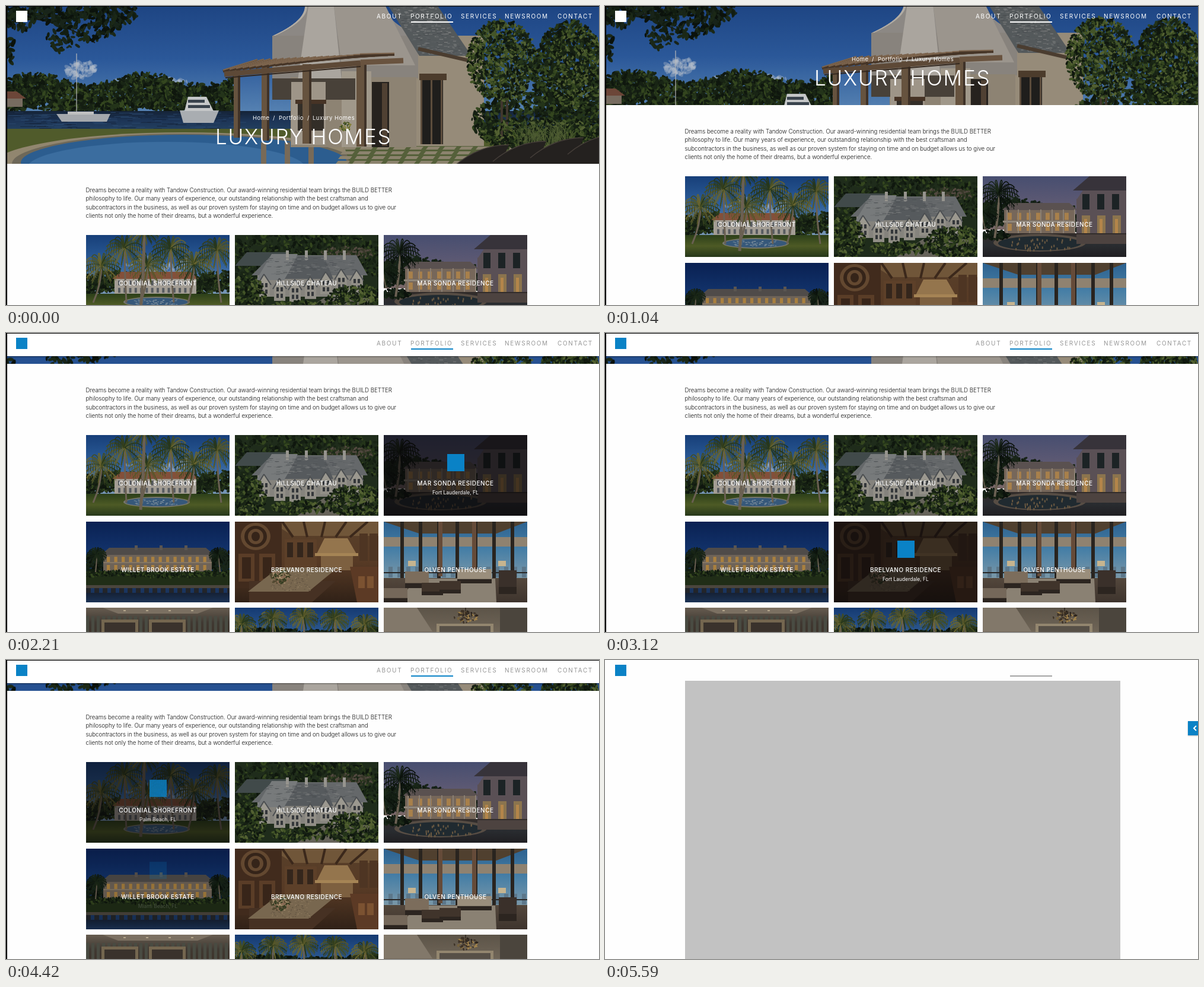
Recreate the animation shown at these times as an HTML page with a canvas. Size 1000x504 px, loop 5720 ms.

```html
<!DOCTYPE html>
<html lang="en">
<head>
<meta charset="utf-8">
<title>Luxury Homes</title>
<style>
html, body { margin: 0; width: 100%; height: 100%; overflow: hidden; background: #fefefe; }
body { position: relative; font-family: Inter, "Open Sans", sans-serif; }
body * { position: absolute; white-space: nowrap; }
.stage { left: 0; top: 0; width: 1000px; height: 504px; overflow: hidden; --y: 0; --k: 0; }

.page { width: 1000px; height: 820px; transform: translateY(calc(var(--y) * -1px)); }
.hero { width: 1000px; height: 266px; overflow: hidden; color: #fff; }
.hero canvas { left: 0; top: 0; transform: translateY(calc(var(--y) * .95px)); }
.crumb { top: 182px; font-size: 9.5px; line-height: 14px; letter-spacing: .5px; }
h1 { left: 353px; top: 200px; margin: 0; font-size: 35px; font-weight: 300; line-height: 41px; letter-spacing: 1.8px; }
p { left: 134.5px; top: 303.8px; margin: 0; font-size: 9.7px; font-weight: 300; line-height: 14.4px; color: #111; }

.tile, .tip { width: 242px; height: 136px; overflow: hidden; color: #fff; text-align: center; }
.tile canvas, .tip { left: 0; top: 0; }
.tip { --h: 0; background: rgba(8, 7, 8, calc(var(--h) * .64)); }
.tip i { left: 107px; top: 32px; width: 29px; height: 29px; background: #0a82c6;
  opacity: var(--h); transform: translateY(calc((var(--h) - 1) * 12px)); }
.tip span { left: 0; width: 100%; top: 91px; font-size: 8.5px; line-height: 12px; opacity: var(--h); }
.tile b { left: 0; width: 100%; top: 75px; font-size: 10px; font-weight: 500; line-height: 12px; letter-spacing: .5px; }

.head { width: 1000px; height: 39px; background: rgba(255, 255, 255, var(--k));
  box-shadow: 0 1px 2px rgba(0, 0, 0, calc(var(--k) * .45)); }
.head a { top: 10px; font-size: 10px; line-height: 15px; letter-spacing: 1.65px;
  color: rgb(calc(255 - 105 * var(--k)), calc(255 - 105 * var(--k)), calc(255 - 105 * var(--k))); }
.mark, .rule { background: rgb(calc(255 - 245 * var(--k)), calc(255 - 125 * var(--k)), calc(255 - 57 * var(--k))); }
.mark { left: 17px; top: 8px; width: 19px; height: 19px; }
.rule { left: 683px; top: 26px; width: 71px; height: 1.6px; }
.edge { width: 1000px; height: 504px; box-sizing: border-box; border: solid #000; border-width: 1px 0 0 2px; }

.load { width: 1000px; height: 504px; background: #fefefe; visibility: hidden; --k: 1; }
.load .rule { background: #a3a3a3; }
.blank { left: 135px; top: 35px; width: 734px; height: 469px; background: #c2c2c2; }
.tab { left: 983px; top: 103px; width: 17px; height: 24px; background: #0a82c6; box-shadow: 0 1px 2px #bbb; }
.tab svg { left: 8px; top: 7px; }
</style>
</head>
<body>
<div class="stage">
  <div class="page">
    <div class="hero">
      <span class="crumb" style="left:416px">Home</span><span class="crumb" style="left:450px">/</span>
      <span class="crumb" style="left:460px">Portfolio</span><span class="crumb" style="left:508px">/</span>
      <span class="crumb" style="left:517px">Luxury Homes</span>
      <h1>LUXURY HOMES</h1>
    </div>
    <p>Dreams become a reality with Tandow Construction. Our award-winning residential team brings the BUILD BETTER<br>philosophy to life. Our many years of experience, our outstanding relationship with the best craftsman and<br>subcontractors in the business, as well as our proven system for staying on time and on budget allows us to give our<br>clients not only the home of their dreams, but a wonderful experience.</p>
  </div>
  <div class="head">
    <div class="mark"></div>
    <a style="left:625px">ABOUT</a><a style="left:682px">PORTFOLIO</a><a style="left:767px">SERVICES</a>
    <a style="left:841px">NEWSROOM</a><a style="left:930px">CONTACT</a>
    <div class="rule"></div>
  </div>
  <div class="edge"></div>
  <div class="load">
    <div class="mark"></div><div class="rule"></div><div class="blank"></div>
    <div class="tab"><svg width="7" height="10"><path d="M6 1L2 5l4 4" fill="none" stroke="#fff" stroke-width="2"/></svg></div>
  </div>
</div>
<script>
let g, seed = 7;
const rand = (a = 0, b = 1) => a + (b - a) * (seed = seed * 16807 % 2147483647) / 2147483647;
const pick = list => list[rand(0, list.length) | 0];
const times = (n, f) => { for (let i = 0; i < n; i++) f(i); };

const box = (c, x, y, w, h) => { g.fillStyle = c; g.fillRect(x, y, w, h); };
const oval = (c, x, y, rx, ry, turn = 0) => {
  g.fillStyle = c; g.beginPath(); g.ellipse(x, y, rx, ry, turn, 0, 7); g.fill();
};
// Top edge a-b at y, bottom edge c-d at y2
const trap = (col, a, b, y, c, d, y2) => {
  g.fillStyle = col; g.beginPath();
  g.moveTo(a, y); g.lineTo(b, y); g.lineTo(d, y2); g.lineTo(c, y2); g.fill();
};
const curve = (c, w, x, y, cx, cy, ex, ey) => {
  g.strokeStyle = c; g.lineWidth = w; g.beginPath(); g.moveTo(x, y); g.quadraticCurveTo(cx, cy, ex, ey); g.stroke();
};
const line = (c, w, x, y, ex, ey) => curve(c, w, x, y, x, y, ex, ey);
const fade = (y, h, ...cols) => {
  const s = g.createLinearGradient(0, y, 0, y + h);
  cols.forEach((c, i) => s.addColorStop(i / (cols.length - 1), c));
  box(s, 0, y, g.canvas.width, h);
};
const row = (c, x, y, w, h, step, n) => times(n, i => box(c, x + i * step, y, w, h));
const leaves = (x, y, rx, ry, n, size, cols) => times(n, () => {
  const a = rand(0, 6.283), r = Math.sqrt(rand()), s = size * rand(.5, 1.2);
  oval(pick(cols), x + Math.cos(a) * rx * r, y + Math.sin(a) * ry * r, s, s * .5, rand(0, 3));
});
// A tree line with a rolling top edge
const hedge = (x, x2, y, h, size, cols) => {
  for (; x < x2; x += size * 2) leaves(x, y + h / 2 - Math.sin(x / 30) * h / 6, size * 2, h / 2, h * 1.3, size, cols);
};
const house = (x, y, w, h, wall, roof, glass, n) => {
  box(wall, x, y, w, h);
  trap(roof, x + 10, x + w - 10, y - 11, x - 4, x + w + 4, y + 1);
  times(2, i => row(glass, x + 6, y + h * (.14 + i * .46), w / n * .4, h * .3, (w - 8) / n, n));
};
const palm = (x, y, tx, ty, r, w, cols) => {
  curve('#6a6052', w, x, y, tx, (y + ty) / 2, tx, ty);
  times(18, i => {
    const a = i * .349, ex = Math.cos(a) * r, ey = Math.sin(a) * r * .7 + r * .2, c = pick(cols);
    curve(c, 1.6, tx, ty, tx + ex * .6, ty + ey - r * .4, tx + ex, ty + ey);
    for (let k = .3; k < 1; k += .12) line(c, 1, tx + ex * k, ty + ey * k - r * .7 * k * (1 - k), tx + ex * k * 1.06, ty + ey * k + r * .2);
  });
};
const green = ['#0f170e', '#192515', '#24341a', '#34461f', '#151f13'];
const lush = [...green, '#445528', '#536132'];
const dark = ['#0b120c', '#121d11', '#1b2817', '#18241a'];
const frond = ['#26361b', '#444d22', '#6a652e', '#343f1d', '#57572a'];
const haze = ['rgba(168,180,198,.4)', 'rgba(190,197,208,.4)'];
const stone = ['#5b5f61', '#6d7071', '#7b7d7d', '#4c5053'];

function hero() {
  box('#1f2c19', 0, 0, 1000, 280);
  fade(0, 180, '#1e4583', '#2b5899', '#5682b2');
  leaves(126, 108, 26, 13, 60, 6, haze);
  leaves(240, 127, 65, 5, 60, 5, haze);
  hedge(0, 385, 122, 62, 5, green);
  trap('#6c4638', 0, 18, 144, 0, 34, 156);
  box('#776c60', 0, 156, 28, 14);
  fade(177, 33, '#152337', '#1d3557', '#23405f');
  times(150, () => box(pick(['#2b4a70', '#142238']), rand(0, 380), rand(179, 207), rand(8, 26), .8));
  // Boats
  line('#b9babb', 1.2, 119, 80, 119, 184);
  trap('#a4a8ac', 85, 176, 182, 94, 170, 195);
  box('#bfc0c0', 104, 178, 44, 5);
  trap('#a9adb1', 293, 359, 176, 299, 350, 197);
  trap('#c5c7c8', 307, 338, 153, 301, 350, 177);
  times(2, i => box('#39434d', 307, 158 + i * 9, 28 + i * 9, 5));
  // Lawn, terrace and pool
  box('#505b2b', 0, 207, 1000, 73);
  oval('#91866f', 300, 270, 325, 57);
  oval('#6e6859', 300, 266, 290, 51);
  oval('#2c5d8f', 300, 264, 275, 47);
  oval('#3b6d9f', 270, 274, 235, 45);
  row('#786a58', 430, 230, 9, 50, 40, 3);
  trap('#55603a', 570, 1000, 236, 585, 1000, 280);
  times(5, j => times(11, i => trap('#8c836e', 572 + i * 28 - j * 4, 592 + i * 28 - j * 4, 237 + j * 8, 568 + i * 28 - j * 4, 588 + i * 28 - j * 4, 242 + j * 8)));
  // Flared chimney, roof and walls
  box('#968b79', 692, 50, 114, 186);
  times(50, y => {
    const half = 68 + 55 * (y / 50) ** 2;
    box('#8c8884', 572 - half, y, half * 2, 1);
    box('#b1aca4', 572 - half, y, 4, 1);
  });
  box('#88837d', 449, 50, 246, 72);
  box('#8d8373', 480, 120, 212, 118);
  trap('#aaa59e', 510, 553, 0, 492, 566, 125);
  trap('#9b958d', 553, 640, 0, 566, 690, 100);
  trap('#54595b', 645, 728, 0, 697, 785, 84);
  times(330, () => {
    const y = rand(0, 82);
    box(pick(stone), 648 + y * .62 + rand(0, 73), y, rand(3, 7), 1.3);
  });
  line('#4b3d30', 6, 695, 72, 785, 93);
  box('#4c3c2c', 697, 114, 46, 11);
  box('#1f1e1c', 699, 125, 38, 108);
  row('#5c4c3c', 699, 125, 3, 108, 17, 3);
  box('#a0988a', 566, 110, 50, 128);
  box('#26221e', 617, 128, 29, 110);
  box('#504133', 634, 130, 9, 106);
  box('#484139', 449, 122, 140, 36);
  box('#9e9588', 481, 128, 58, 106);
  box('#332e28', 492, 164, 44, 46);
  box('#463325', 488, 158, 52, 7);
  // Pergola
  times(4, i => {
    const x = 384 + 36 * i + 11 * i * i, w = 11 + i * 2;
    box('#66533f', x, 104 - i * 3, w, 118 + i * 8);
    box('#3f3228', x + w - 4, 104 - i * 3, 4, 118 + i * 8);
  });
  times(22, i => {
    line('#463527', 5, 366 + i * 11, 110 - i * 1.3, 424 + i * 11, 92 - i * .5);
    line('#7d654e', 2, 366 + i * 11, 108 - i * 1.3, 424 + i * 11, 90 - i * .5);
  });
  line('#5d4937', 9, 368, 115, 598, 96);
  line('#69533f', 9, 598, 95, 670, 92);
  line('#33271e', 2, 370, 121, 598, 102);
  leaves(572, 203, 10, 8, 60, 2, ['#52602a', '#85803a', '#34481d']);
  // Garden and chairs
  leaves(895, 195, 110, 50, 900, 5, green);
  leaves(950, 120, 62, 95, 1400, 5, green);
  row('#40372e', 834, 150, 4, 88, 9, 2);
  leaves(836, 92, 58, 68, 1500, 4, lush);
  leaves(962, 105, 48, 70, 700, 4, lush);
  leaves(900, 215, 100, 26, 700, 4, lush);
  times(90, () => {
    const x = rand(860, 950), y = rand(225, 248);
    curve('#4d5b32', 1, x, y, x + 3, y - 22, x + rand(-22, 22), y - 32);
  });
  times(4, i => {
    const x = 758 + i * 63, y = 268 - i * 6;
    g.fillStyle = '#24211f'; g.beginPath(); g.moveTo(x, y);
    g.quadraticCurveTo(x + 40, y - 34, x + 90, y - 34);
    g.quadraticCurveTo(x + 80, y - 5, x + 50, 285); g.lineTo(x, 285); g.fill();
    curve('#453e39', 1.5, x, y, x + 40, y - 34, x + 90, y - 34);
  });
  // Overhanging branches
  line('#1a1b15', 3, 0, 28, 200, 0);
  curve('#1a1b15', 2, 50, 22, 100, 30, 150, 62);
  times(9, i => leaves(i * 25, 13 + 9 * Math.sin(i * 2), 22, 19, 48, 6, dark));
  times(4, i => leaves(88 + i * 28, 58 - i * 8, 20, 20, 26, 6, dark));
  leaves(6, 72, 8, 24, 20, 6, dark);
}

const scenes = [
  () => {
    fade(0, 100, '#173f79', '#2f609c', '#7a98b6');
    leaves(125, 50, 60, 16, 40, 6, haze);
    hedge(0, 242, 66, 36, 4, green);
    house(48, 73, 138, 27, '#a39d94', '#83503a', '#575b60', 14);
    fade(99, 37, '#2c3f19', '#4d5a25', '#27381a');
    oval('#77776b', 119, 113, 56, 9);
    oval('#36587a', 119, 113, 53, 7);
    times(60, () => box('#7c8e9c', rand(80, 155), rand(108, 117), 3, 1));
    times(6, i => palm(12 + i * 40 + i % 2 * 16, 114, 26 + i * 39, 36 + 15 * Math.cos(i * 3), 33, 3, frond));
    palm(92, 126, 98, -8, 26, 5, frond);
  },
  () => {
    box('#1f2c1b', 0, 0, 242, 136);
    leaves(120, 40, 150, 50, 1100, 4, green);
    trap('#414a4a', 20, 92, 29, 0, 60, 52);
    leaves(190, 30, 45, 10, 160, 3, ['#51483f', '#38392a', '#29351f']);
    box('#85837d', 38, 62, 178, 42);
    trap('#65686a', 62, 205, 34, 28, 224, 68);
    trap('#777a7b', 62, 106, 32, 36, 84, 76);
    trap('#565a5d', 106, 150, 36, 84, 166, 74);
    row('#96948e', 86, 26, 5, 16, 32, 4);
    times(130, () => box(pick(stone), rand(50, 200), rand(38, 66), 7, 1));
    times(7, i => {
      const x = 40 + i * 26, y = 66 + 9 * Math.sin(i * .9);
      trap('#9b988f', x + 9, x + 10, y, x, x + 19, y + 16);
      box('#918e86', x, y + 16, 19, 22);
      line('#4b4e51', 2, x - 2, y + 18, x + 9, y);
      line('#4b4e51', 2, x + 21, y + 18, x + 9, y);
      times(2, j => row('#34373a', x + 4, y + 15 + j * 11, 4, 7, 7, 2));
    });
    leaves(10, 106, 42, 40, 500, 4, lush);
    trap('#66635a', 150, 242, 106, 105, 200, 136);
    leaves(208, 112, 56, 26, 600, 4, lush);
    leaves(110, 122, 50, 10, 170, 4, lush);
  },
  () => {
    fade(0, 90, '#474e70', '#5d5973', '#7b6968');
    hedge(0, 160, 44, 46, 4, dark);
    house(36, 56, 120, 40, '#76675a', '#5a5150', '#a8804b', 7);
    box('#90877b', 34, 75, 122, 3);
    row('#8a7f73', 40, 56, 2, 40, 19, 7);
    trap('#5a5055', 185, 242, 0, 158, 242, 40);
    box('#5a5055', 158, 38, 84, 98);
    trap('#37333a', 180, 242, 0, 152, 242, 24);
    row('#1c2325', 168, 30, 12, 26, 25, 3);
    row('#8b744e', 167, 66, 14, 44, 26, 3);
    row('#b3854a', 171, 72, 5, 30, 26, 3);
    fade(96, 40, '#322c2a', '#292c30', '#201f22');
    oval('#574d44', 96, 112, 78, 15);
    oval('#202a30', 96, 113, 70, 12);
    times(40, () => box('#6c5a42', rand(45, 150), rand(104, 123), 2, 4));
    box('#4d4340', 158, 98, 84, 16);
    leaves(18, 99, 27, 7, 90, 4, dark);
    palm(20, 104, 27, 28, 35, 4, dark);
    palm(4, 90, 0, 60, 26, 2, dark);
  },
  () => {
    fade(0, 136, '#0a2153', '#153973', '#1b3358');
    hedge(0, 242, 56, 34, 4, dark);
    house(29, 55, 183, 30, '#6e6358', '#4f4b49', '#a9803f', 14);
    row('#5a5551', 82, 40, 5, 8, 42, 3);
    box('#857764', 29, 68, 183, 2);
    box('#202d17', 0, 84, 242, 24);
    hedge(0, 242, 84, 9, 3, green);
    box('#4a453d', 0, 107, 242, 5);
    row('#22252a', 0, 112, 8, 9, 14, 18);
    fade(120, 16, '#152135', '#1c3356');
    times(2, i => palm(16 + i * 210, 85, 18 + i * 206, 54, 17, 2, dark));
  },
  () => {
    fade(0, 136, '#58402a', '#573a25', '#302117');
    trap('#705639', 60, 242, 0, 98, 242, 24);
    times(5, i => line('#3b281b', 4, 80 + i * 36, 0, 98 + i * 24, 26));
    box('#412b1d', 0, 0, 79, 112);
    times(4, i => oval(i % 2 ? '#352419' : '#634830', 35, 25, 25 - i * 6, 23 - i * 5));
    row('#5a3d27', 6, 54, 27, 47, 35, 2);
    row('#382519', 12, 60, 15, 36, 35, 2);
    box('#5d4029', 84, 30, 54, 47);
    row('#34261c', 88, 35, 10, 25, 17, 3);
    trap('#94754d', 151, 190, 28, 137, 206, 56);
    box('#a58455', 135, 53, 73, 5);
    box('#7d6040', 145, 58, 54, 24);
    row('#4e3523', 210, 20, 14, 46, 17, 2);
    trap('#5c3a25', 194, 242, 76, 206, 242, 136);
    row('#7b5231', 208, 92, 11, 20, 15, 2);
    trap('#463123', 24, 170, 100, 24, 130, 136);
    trap('#78674f', 74, 174, 77, 22, 124, 118);
    times(160, () => box(pick(['#8d7a5f', '#605241']), rand(60, 128), rand(79, 116), 2, 1));
    leaves(76, 92, 16, 12, 110, 3, ['#aa9471', '#514830', '#866a52', '#363e23']);
  },
  () => {
    fade(0, 96, '#2c618f', '#477fa6', '#7b98a8');
    row('#5c778a', 8, 76, 7, 18, 15, 16);
    trap('#50402f', 0, 242, 0, 60, 190, 20);
    trap('#8f8270', 0, 242, 26, 0, 242, 42);
    row('#29241f', 28, 0, 6, 103, 31, 7);
    row('#654b39', 92, 0, 7, 92, 57, 2);
    line('#292725', 2, 0, 86, 242, 86);
    fade(95, 41, '#53473c', '#3e342d');
    trap('#8a8173', 54, 188, 96, 24, 190, 136);
    const seat = (c, x, y, w, h) => { box(c, x, y, w, h); box('#2c2520', x, y + h * .7, w, h * .3); };
    seat('#7c6d5c', 36, 84, 40, 28);
    seat('#9a8e7c', 124, 80, 58, 24);
    times(2, i => seat('#40342b', 64 + i * 30, 103 - i * 3, 36, 21));
    seat('#3a302a', 194, 82, 30, 40);
    seat('#75685a', 0, 112, 40, 24);
    times(2, i => box('#c6b48f', 41 + i * 152, 66, 13, 9));
  },
  () => {
    fade(0, 50, '#665c50', '#403932', '#3d3128');
    trap('#7b7062', 28, 214, 0, 54, 188, 10);
    row('#b5a78d', 63, 4, 4, 2, 38, 4);
    row('#494b42', 0, 14, 5, 36, 9, 27);
    times(2, i => { box('#74664f', 26 + i * 80, 20, 62, 30); box('#3a322c', 31 + i * 80, 25, 52, 25); });
  },
  () => {
    fade(0, 50, '#153a72', '#315f96');
    hedge(0, 242, 36, 16, 4, dark);
    times(5, i => palm(10 + i * 54, 60, 12 + i * 52, 26 - 12 * Math.sin(i * .8), 25, 3, frond));
  },
  () => {
    fade(0, 50, '#5c5448', '#74695b');
    trap('#82786a', 0, 56, 0, 0, 82, 40);
    box('#4b453d', 196, 0, 46, 50);
    box('#93866f', 89, 27, 96, 23);
    box('#575047', 94, 31, 86, 19);
    line('#2c241d', 1.5, 138, 0, 138, 18);
    leaves(138, 15, 20, 10, 70, 2.5, ['#2c241d', '#75613c', '#3e3226', '#a1824b']);
  }
];
const labels = [
  ['COLONIAL SHOREFRONT', 'Palm Beach, FL'], ['HILLSIDE CHATEAU', ''], ['MAR SONDA RESIDENCE', 'Fort Lauderdale, FL'],
  ['WILLET BROOK ESTATE', 'Miami Beach, FL'], ['BRELVANO RESIDENCE', 'Fort Lauderdale, FL'], ['OLVEN PENTHOUSE', 'Miami Beach, FL']
];

const find = s => document.querySelector(s);
function paint(host, w, h, draw) {
  const c = document.createElement('canvas');
  c.width = w; c.height = h;
  g = c.getContext('2d');
  draw();
  host.prepend(c);
}
paint(find('.hero'), 1000, 280, hero);
scenes.forEach((draw, i) => {
  const tile = document.createElement('div');
  tile.className = 'tile';
  tile.style.left = 135 + i % 3 * 251 + 'px';
  tile.style.top = 386 + (i / 3 | 0) * 145.5 + 'px';
  if (labels[i]) {
    const [name, city] = labels[i];
    tile.innerHTML = `<div class="tip"><i></i><span>${city}</span></div><b>${name}</b>`;
  }
  paint(tile, 242, 136, draw);
  find('.page').append(tile);
});

const LOOP = 5720, TICK = 130, FADE = 390;
// The pointer's visits: tile and time of arrival
const visits = [[2, 1380], [5, 2340], [4, 2730], [3, 3510], [0, 4100]];
const tips = document.querySelectorAll('.tip');
const ramp = (t, from, span) => Math.min(1, Math.max(0, (t - from) / span));

function pose(t) {
  const stage = find('.stage').style;
  stage.setProperty('--y', Math.round(214 * (1 - (1 - ramp(t, 520, 1300)) ** 1.22)));
  stage.setProperty('--k', ramp(t, 1330, FADE));
  visits.forEach(([tile, from], i) => {
    const until = i + 1 < visits.length ? visits[i + 1][1] : LOOP;
    tips[tile].style.setProperty('--h', ramp(t, from, FADE) - ramp(t, until, FADE));
  });
  find('.load').style.visibility = t < LOOP - TICK ? 'hidden' : 'visible';
}
const start = performance.now();
function play() {
  const t = (performance.now() - start) % LOOP;
  pose(Math.floor(t / TICK + .01) * TICK);
  requestAnimationFrame(play);
}
play();
</script>
</body>
</html>
```
